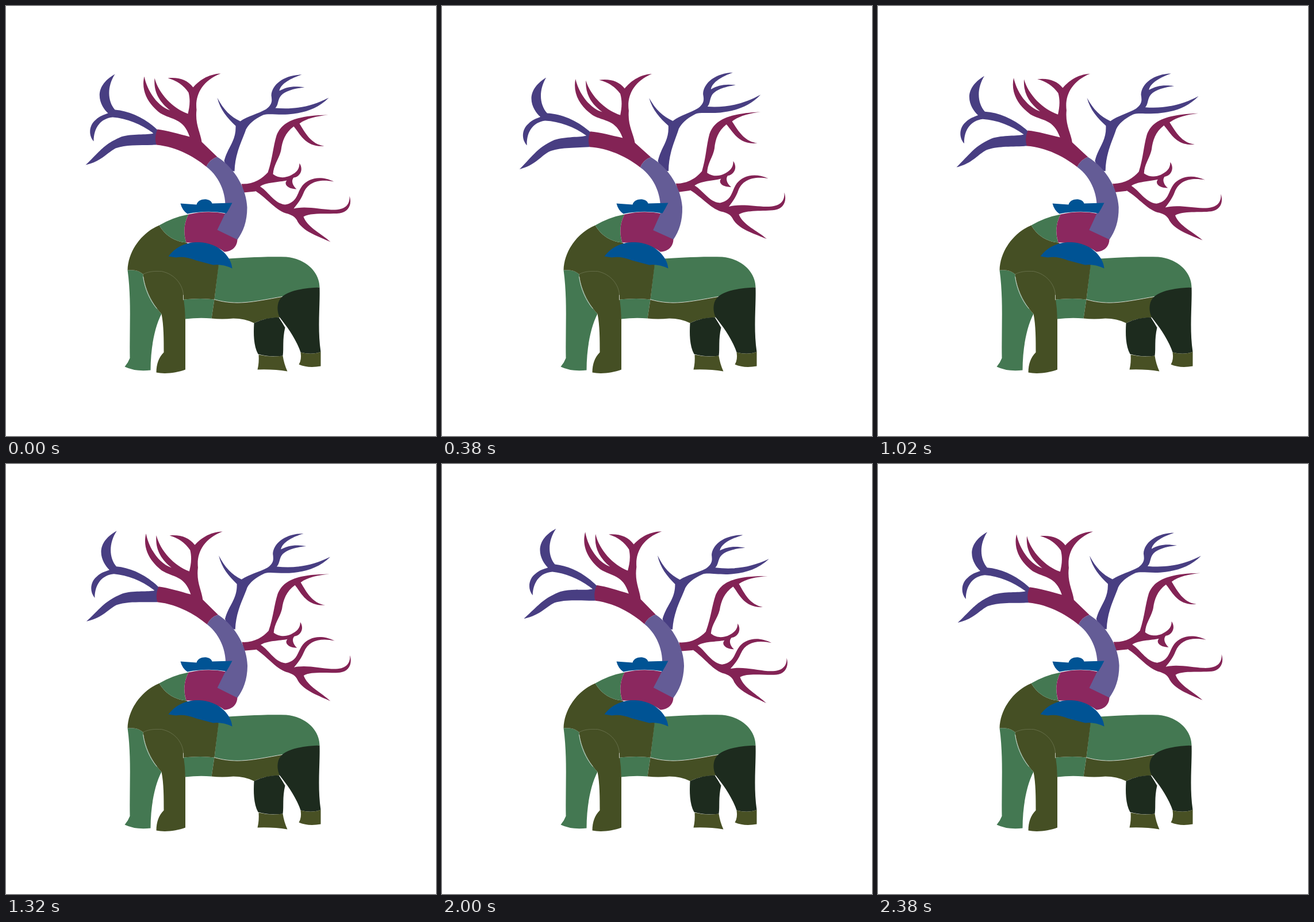
An HTML page for the animation above (2400 ms loop, 748 by 748 pixels).

```html
<!DOCTYPE html>
<html lang="en">
<head>
<meta charset="utf-8">
<title>Elephant tree</title>
<style>
html, body { margin: 0; width: 100%; height: 100%; overflow: hidden; background: #fff; }
svg { display: block; width: 100vw; height: 100vh; }
.plum { fill: #832355; }
.violet { fill: #483e82; }
.trunk { fill: #645c96; }
.face { fill: #8b285f; }
.blue { fill: #005394; }
.green { fill: #447852; }
.olive { fill: #454f24; }
.moss { fill: #485024; }
.dark { fill: #1d2b1e; }
.seam { fill: none; stroke: #fff; stroke-width: .7; }
.faint { stroke: #858c6c; stroke-width: .5; }
</style>
</head>
<body>
<svg viewBox="-.5 -.5 748 748">
  <g id="body">
    <path class="green" d="M211 459Q228 457 238 466C240 490 255 520 270 535C257 560 251 598 251 633Q225 636 206 627Q212 620 215 612C214 560 218 510 211 459Z"/>
    <path class="green" d="M308 510Q340 507 362 510L357 543Q335 541 311 544Z"/>
    <path class="green" d="M370 440Q380 440 386 439C410 438 440 435 487 436C525 440 545 465 545 489Q505 493 480 505C430 514 400 521 362 510Z"/>
    <path class="olive" d="M362 510C400 521 430 514 480 505Q482 520 476 541Q450 542 431 551Q415 543 395 543Q375 545 357 543Z"/>
    <path class="olive" d="M266 381C237 393 212 424 211 459Q228 457 238 466L308 510Q340 507 362 510L370 445L313 411Q282 408 266 381Z"/>
    <path class="olive" d="M238 466C250 460 260 461 270 461C294 466 307 485 308 505Q311 525 311.5 545L311.5 632C296 638 275 640 261 637Q261 615 274 602C274 580 274 555 270 535C255 520 240 490 238 466Z"/>
    <path class="green" d="M266 381Q290 367 317 362Q305 385 313 411Q282 408 266 381Z"/>
    <path class="dark" d="M545 489C520 490 495 493 480 505C470 514 470 530 476 542C487 555 505 580 512 602Q532 607 547 601C541 560 546 520 545 489Z"/>
    <path class="dark" d="M431 551Q452 541 474 541Q480 550 485 559C480 580 483 595 481 608Q460 611 438 605C430 590 430 570 431 551Z"/>
    <path class="moss" d="M439 606Q460 611 481 608Q483 622 489 635Q465 631 437 632Q440 620 439 606Z"/>
    <path class="moss" d="M512 602Q532 607 547 601L547 626Q525 630 509 623Q514 615 512 602Z"/>
    <path class="seam" d="M362 510C400 521 430 514 480 505M238 470C241 492 250 512 262 526M308 502V511M476 542L485 557"/>
    <path class="seam faint" d="M238 466C250 460 260 461 270 461C294 466 307 485 308 502"/>
    <path class="face" d="M317 362Q350 354 383 361L390 385L402 405C402 420 390 427 379 427C365 415 335 411 313 411Q305 385 317 362Z"/>
  </g>
  <g id="tree">
    <path class="violet" d="M379 269C385 245 400 235 399 208C385 195 372 180 367 159C378 180 390 192 407 200C420 191 438 187 452 179C464 170 462 163 461 155C462 135 485 119 514 119C495 125 477 135 475 147C488 140 500 138 519 141C500 143 482 148 476 158C472 165 473 172 468 177C500 180 530 175 561 159C540 180 515 186 490 188C470 189 455 186 447 189C430 197 422 205 417 214C410 235 398 255 397 287L385 285Z"/>
    <path class="plum" d="M409 309C430 310 445 300 455 289C463 265 464 245 470 225C478 205 495 190 560 189C540 191 522 195 510 204C520 220 530 240 553 243C520 246 510 220 500 209C485 220 480 235 478 250C475 265 465 275 464 292C475 300 485 298 493 295C503 290 510 285 510 273C518 285 510 297 500 298C495 303 498 312 505 318C490 318 482 310 488 303C475 306 450 306 441 314L433 322L413 324Z"/>
    <path class="plum" d="M439 312C455 320 465 343 485 345C507 341 505 325 515 312C525 300 545 293 570 305C545 300 525 305 517 325C512 338 505 345 500 352C520 347 545 353 565 354C590 355 598 345 597 330C602 345 595 358 580 360C560 362 530 358 517 366C524 385 548 395 564 410C545 401 518 393 507 375C503 365 495 363 490 361C470 357 455 335 433 321Z"/>
    <path class="violet" d="M261 241C230 242 210 240 190 247C175 255 165 270 138 276C165 250 170 240 200 227C220 221 245 224 256 221C235 205 210 195 185 193C165 195 152 210 152 235C141 222 146 205 155 198C163 190 170 189 177 186C165 175 146 143 189 118C175 140 176 165 189 180C215 182 242 195 263 215Z"/>
    <path class="plum" d="M263 214Q257 228 261 241C294 244 325 260 348 279Q354 266 367 262L340 236C338 220 328 205 331 180C328 155 340 130 373 117C350 118 335 130 325 141C315 128 300 123 281 125Q304 131 317 150C321 165 318 178 316 187C290 178 265 152 258 125C256 149 266 166 285 181C263 174 245 147 240 122C234 148 247 170 268 186C288 198 308 194 319 227C300 222 280 216 263 214Z"/>
    <path class="trunk" d="M367 389L380 362C385 331 373 298 348 279Q354 266 367 262C400 283 418 320 419 350C419 375 412 392 402 406Z"/>
  </g>
  <path class="blue" d="M303 343L331 345C334 333 355 333 358 343L393 342Q388 352 383 360Q350 354 315 361Q306 355 303 343Z"/>
  <path class="blue" d="M282 435C305 405 340 409 355 414C375 420 392 438 393 456Q375 448 360 450Q345 446 330 442Q310 434 295 437Z"/>
</svg>
<script>
const LOOP = 2400, SWING = 2.05;
const tree = document.getElementById('tree');

function draw(now) {
  const phase = (now % LOOP) / LOOP;
  const angle = -SWING * Math.sin(phase * 2 * Math.PI);
  tree.setAttribute('transform', `rotate(${angle.toFixed(4)} 384 400)`);
}

let start;
function tick(now) {
  start ??= now;
  draw(now - start);
  requestAnimationFrame(tick);
}
draw(0);
requestAnimationFrame(tick);
</script>
</body>
</html>
```
